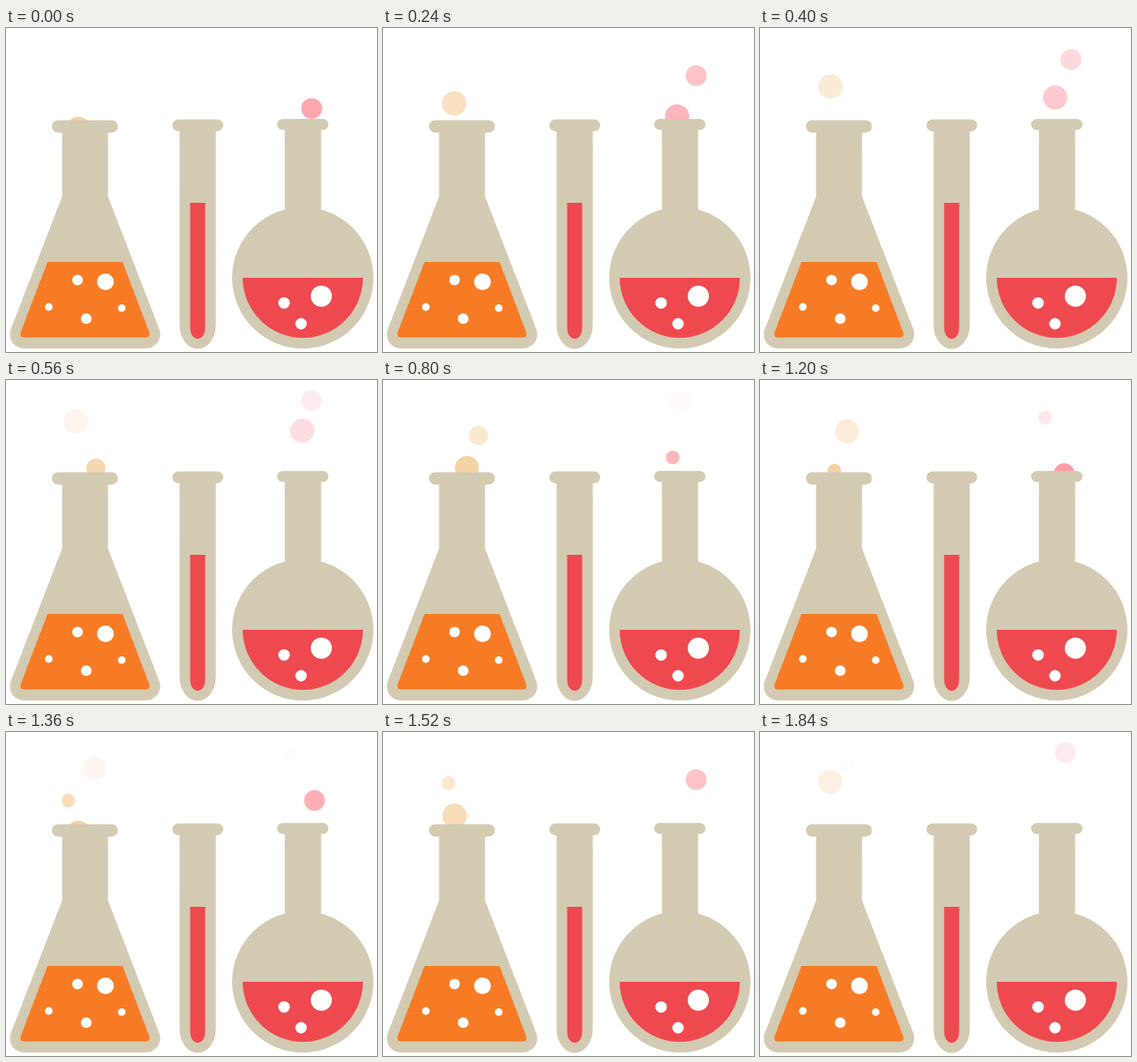
Animation of 420 by 367 pixels, one loop 1920 ms. Source, as an HTML page:

```html
<!DOCTYPE html>
<html lang="en">
<head>
<meta charset="utf-8">
<title>Bubbling flasks</title>
<style>
  html, body { margin: 0; width: 100%; height: 100%; overflow: hidden; background: #fff; }
  svg { display: block; width: 420px; height: 367px; }
  .glass { fill: #d3cab2; }
  .orange { fill: #f67b24; }
  .red { fill: #ee494f; }
  .foam { fill: #fff; }
</style>
</head>
<body>
<svg viewBox="0 0 420 367">
  <g id="bubbles"></g>

  <g class="glass">
    <rect x="52" y="104.5" width="74.6" height="14" rx="7"/>
    <path d="M63.5 110V191L5.5 341C1.5 352 9 363 21 363H158C170 363 177.5 352 173.5 341L115.5 191V110Z"/>
    <rect x="188.3" y="103.5" width="57.5" height="13.6" rx="6.8"/>
    <path d="M196.5 110V336.5A20.5 27 0 0 0 237.500 336.5V110Z"/>
    <rect x="307" y="103" width="58" height="12.6" rx="6.3"/>
    <rect x="315.7" y="109" width="41" height="110"/>
    <circle cx="336" cy="283" r="80"/>
  </g>

  <path class="orange" d="M47 265H132L162 344.5Q164 350.5 158 350.5H21Q14.5 350.5 16.7 344.5Z"/>
  <path class="red" d="M208.5 198V340A8.5 12 0 0 0 225.5 340V198Z"/>
  <path class="red" d="M268 283A68 68 0 0 0 404 283Z"/>

  <g class="foam">
    <circle cx="81" cy="285.5" r="6"/>
    <circle cx="112.6" cy="287.5" r="9.5"/>
    <circle cx="48.5" cy="316" r="4.4"/>
    <circle cx="90.8" cy="329.2" r="6"/>
    <circle cx="131" cy="317.2" r="4.3"/>
    <circle cx="314.8" cy="311.4" r="6.5"/>
    <circle cx="357" cy="303.8" r="12"/>
    <circle cx="334" cy="335" r="6.5"/>
  </g>
</svg>
<script>
  const STEP = 80, STEPS = 24, LIFE = 11, FADE = 0.085;
  const PEACH = '#f0c081', PINK = '#fb8a94';
  const SLOWING = 1.75;

  // x, top: where the bubble vanishes; lean, rise: travel over ten steps;
  // sway: sideways swing (swinging bubbles also slow down); ends: steps at which it vanishes.
  const bubbles = [
    { color: PEACH, r: 13.8, x: 78.2, lean: 4.3, top: 29.7, rise: 96, ends: [8.8, 25.8] },
    { color: PEACH, r: 13.6, x: 101, lean: -7, top: 29, rise: 83, ends: [18.5] },
    { color: PEACH, r: 11, x: 107.2, lean: -11, sway: -8, top: 38, rise: 105, ends: [14.4] },
    { color: PEACH, r: 7.8, x: 86.8, lean: -8, sway: 13, top: 36.5, rise: 90, ends: [23.4] },
    { color: PINK, r: 11.8, x: 349.5, lean: 0, sway: -5.2, top: 18, rise: 88, ends: [9, 25] },
    { color: PINK, r: 13.7, x: 337.3, lean: -5.8, top: 21, rise: 107, ends: [10.4] },
    { color: PINK, r: 7.8, x: 320.7, lean: 10, top: 22, rise: 90, ends: [17.3] }
  ];

  const layer = document.getElementById('bubbles');
  for (const b of bubbles) {
    b.node = document.createElementNS('http://www.w3.org/2000/svg', 'circle');
    b.node.setAttribute('r', b.r);
    b.node.setAttribute('fill', b.color);
    layer.append(b.node);
  }

  function place({ node, x, lean, sway = 0, top, rise, ends }, step) {
    const left = ends.map(end => end - step).find(n => n > 0 && n <= LIFE) || 0;
    const part = left / 10;
    const swing = sway * Math.cos(0.67 * (left - 0.9));
    node.setAttribute('cx', x + lean * part + swing);
    node.setAttribute('cy', top + rise * part ** (sway ? SLOWING : 1));
    node.setAttribute('opacity', FADE * left);
  }

  const start = performance.now();
  function tick() {
    const step = Math.floor((performance.now() - start) / STEP) % STEPS;
    bubbles.forEach(b => place(b, step));
    requestAnimationFrame(tick);
  }
  tick();
</script>
</body>
</html>
```
